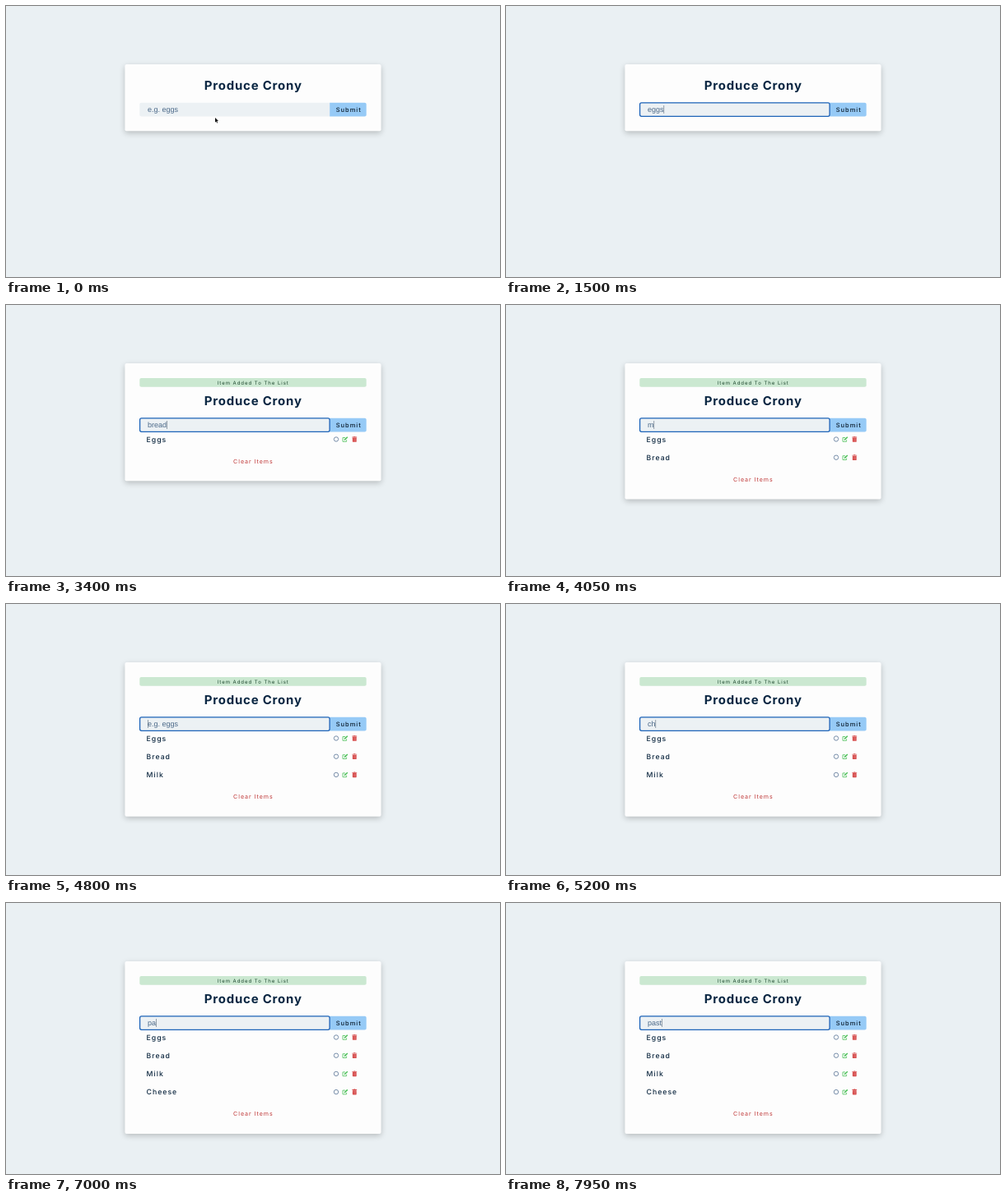
An HTML page with a canvas that plays this animation: 600x330 px, repeating every 8 s.

```html
<!DOCTYPE html>
<html lang="en">
<head>
<meta charset="utf-8">
<title>Shopping list</title>
<style>
  html, body { margin: 0; width: 600px; height: 330px; overflow: hidden; background: #eaf0f3; }
  canvas { display: block; width: 600px; height: 330px; }
</style>
</head>
<body>
<canvas id="stage"></canvas>
<script>
const W = 600, H = 330, LOOP = 8000;
const canvas = document.getElementById('stage');
const ctx = canvas.getContext('2d');
const dpr = window.devicePixelRatio || 1;
canvas.width = W * dpr;
canvas.height = H * dpr;

const UI = 'Inter, sans-serif';
const FIELD = '"Liberation Sans", Arial, sans-serif';
const ROW = 22.2;
const FOCUS_AT = 450;

// Each word: key press times, then the time it is submitted.
const words = [
  { text: 'eggs', keys: [900, 1150, 1250, 1500], submit: 1600 },
  { text: 'bread', keys: [2000, 2400, 2700, 2950, 3300], submit: 3500 },
  { text: 'milk', keys: [3950, 4200, 4300, 4450], submit: 4600 },
  { text: 'cheese', keys: [5000, 5200, 5400, 5550, 5950, 6150], submit: 6400 },
  { text: 'past', keys: [6800, 6950, 7250, 7700], submit: Infinity },
];
const capitalize = s => s[0].toUpperCase() + s.slice(1);

function stateAt(t) {
  const items = words.filter(w => t >= w.submit).map(w => capitalize(w.text));
  const word = words[items.length];
  const typed = word.text.slice(0, word.keys.filter(k => t >= k).length);
  return { items, typed, focused: t >= FOCUS_AT };
}

function box(x, y, w, h, radius, fill) {
  ctx.beginPath();
  ctx.roundRect(x, y, w, h, radius);
  ctx.fillStyle = fill;
  ctx.fill();
}

function label(text, x, y, { size, weight = 400, color, spacing = 0, align = 'left', family = UI }) {
  ctx.font = `${weight} ${size}px ${family}`;
  ctx.letterSpacing = `${spacing}px`;
  ctx.textAlign = align;
  ctx.fillStyle = color;
  ctx.fillText(text, x, y);
  return ctx.measureText(text).width;
}

function stroke(color, width, points) {
  ctx.beginPath();
  points.forEach(([x, y]) => ctx.lineTo(x, y));
  ctx.strokeStyle = color;
  ctx.lineWidth = width;
  ctx.stroke();
}

function drawCard(bottom) {
  ctx.save();
  ctx.shadowColor = 'rgba(0,0,0,0.22)';
  ctx.shadowBlur = 7.3 * dpr;
  ctx.shadowOffsetY = 2.4 * dpr;
  box(144.4, 71, 311.2, bottom - 71, 2, '#fdfdfd');
  ctx.restore();
}

function drawField(y, typed, focused) {
  box(162.3, y, 230.9, 16.6, [2, 0, 0, 2], '#ecf1f4');
  box(393.2, y, 44.5, 16.6, [0, 2, 2, 0], '#96caf6');
  label('Submit', 416.2, y + 10.9, { size: 7.5, weight: 500, color: '#0b1c2c', spacing: 1, align: 'center' });

  const style = { size: 9, color: '#4a6888', family: FIELD };
  const width = label(typed || 'e.g. eggs', 172, y + 11.3, style);
  if (!focused) return;
  ctx.beginPath();
  ctx.roundRect(162.6, y + 0.1, 230.5, 16.4, 2);
  ctx.strokeStyle = '#1d63b8';
  ctx.lineWidth = 1.3;
  ctx.stroke();
  ctx.fillStyle = 'rgba(40,60,80,0.75)';
  ctx.fillRect(172 + (typed ? width : 0), y + 3.2, 0.6, 10);
}

function drawIcons(y) {
  ctx.beginPath();
  ctx.arc(401, y, 2.7, 0, Math.PI * 2);
  ctx.strokeStyle = '#627d9c';
  ctx.lineWidth = 0.85;
  ctx.stroke();

  const green = '#4cc058';
  stroke(green, 0.8, [[412, y - 2], [409, y - 2], [409, y + 2.8], [413.6, y + 2.8], [413.6, y + 0.8]]);
  stroke(green, 1.5, [[411, y + 0.9], [414.8, y - 2.7]]);

  const red = '#d64a4a';
  box(420.4, y - 3, 5.8, 0.9, 0.2, red);
  box(422.2, y - 3.5, 2.2, 0.7, 0.2, red);
  box(420.9, y - 1.8, 4.8, 5.1, 0.6, red);
  ctx.fillStyle = 'rgba(255,255,255,0.35)';
  for (const x of [422, 423.15, 424.3]) ctx.fillRect(x, y - 1, 0.35, 3.4);
}

function drawPointer(t) {
  if (t >= words[0].keys[0]) return;
  const p = Math.min(1, Math.max(0, Math.floor(t / 50) / 5));
  const ease = 1 - (1 - p) ** 2;
  const x = 254 - 26 * ease, y = 136 - 13.5 * ease;
  if (y < 134) {
    const ink = '#26323c';
    stroke(ink, 0.7, [[x, y - 4], [x, y + 4]]);
    for (const side of [-1, 1]) {
      stroke(ink, 0.6, [[x - 1.5, y + side * 4.7], [x, y + side * 4], [x + 1.5, y + side * 4.7]]);
    }
    return;
  }
  const arrow = [[0, 0], [0, 5.7], [1.3, 4.5], [2.2, 6.6], [3.1, 6.2], [2.2, 4.2], [4, 4.1]];
  ctx.beginPath();
  arrow.forEach(([dx, dy]) => ctx.lineTo(x + dx, y + dy));
  ctx.closePath();
  ctx.strokeStyle = '#fff';
  ctx.lineWidth = 0.9;
  ctx.stroke();
  ctx.fillStyle = '#111';
  ctx.fill();
}

function draw(t) {
  const { items, typed, focused } = stateAt(t);
  const count = items.length;
  const shift = count ? 20 : 0;

  ctx.setTransform(dpr, 0, 0, dpr, 0, 0);
  ctx.textRendering = 'geometricPrecision';
  ctx.fillStyle = '#eaf0f3';
  ctx.fillRect(0, 0, W, H);
  drawCard(count ? 192.1 + count * ROW : 152.3);

  if (count) {
    box(162.3, 89, 275.4, 10.8, 2, '#cbe8d1');
    label('Item Added To The List', 300.2, 96.7,
      { size: 6.05, color: '#1f4a30', spacing: 0.95, align: 'center' });
  }
  label('Produce Crony', 300.2, 102.4 + shift,
    { size: 15, weight: 700, color: '#0b2743', spacing: 0.78, align: 'center' });
  drawField(117.8 + shift, typed, focused);

  items.forEach((item, i) => {
    const y = 163.5 + i * ROW;
    label(item, 170.6, y + 3.2, { size: 8.7, weight: 500, color: '#102a42', spacing: 1 });
    drawIcons(y);
  });
  if (count) {
    label('Clear Items', 300.4, 170.3 + count * ROW,
      { size: 7.1, color: '#c03a3a', spacing: 0.95, align: 'center' });
  }
  drawPointer(t);
}

function tick() {
  draw(performance.now() % LOOP);
  requestAnimationFrame(tick);
}
tick();
</script>
</body>
</html>
```
